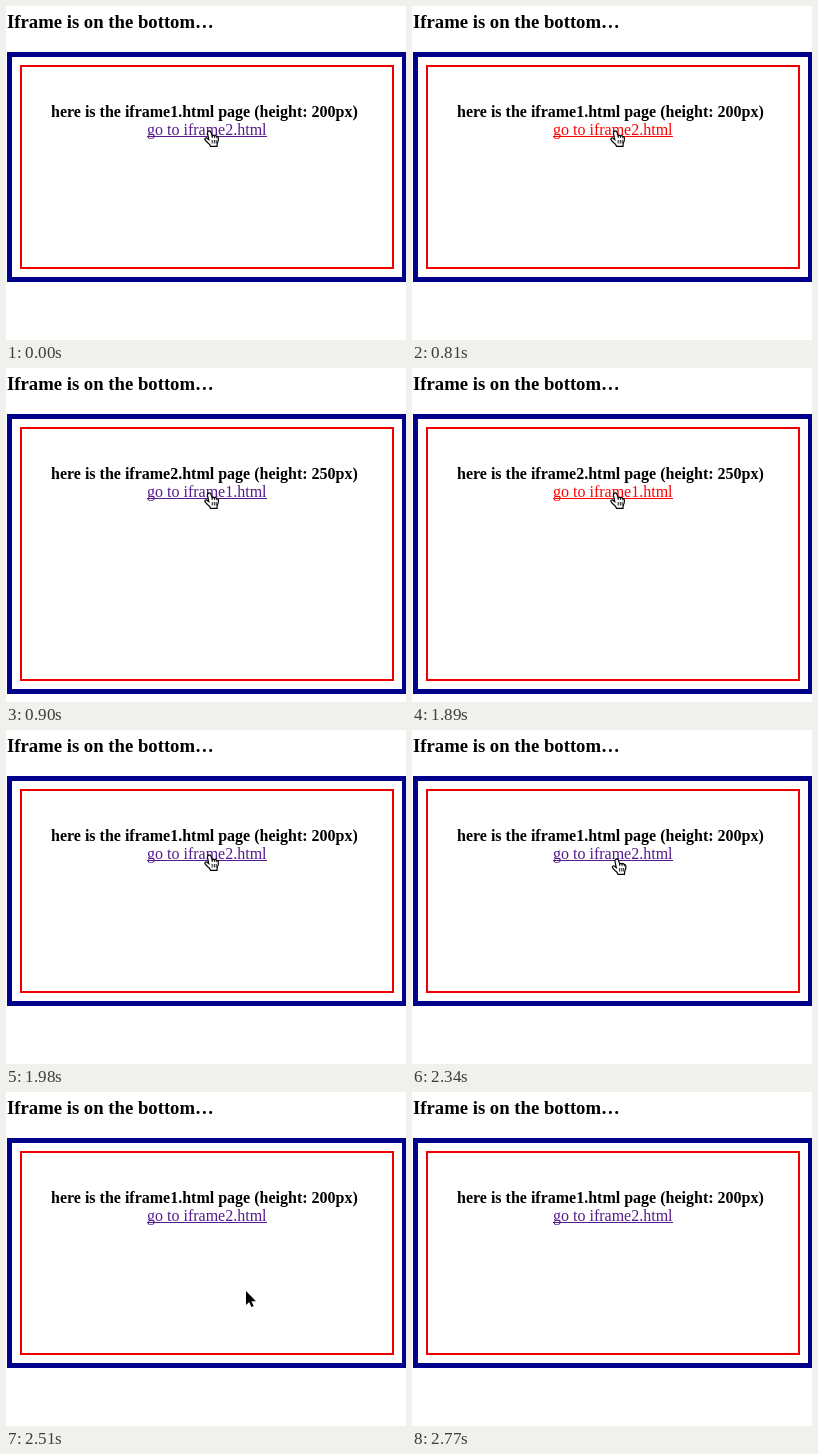
Animation, 400 px wide and 334 px high, one loop 2.94 s. Source, as an HTML page with a canvas:

```html
<!DOCTYPE html>
<html lang="en">
<head>
<meta charset="utf-8">
<title>Iframe height</title>
<style>
  html, body { margin: 0; width: 100%; height: 100%; overflow: hidden; background: #fff; }
  canvas { display: block; }
</style>
</head>
<body>
<canvas id="stage" width="400" height="334"></canvas>
<script>
const ctx = document.getElementById('stage').getContext('2d');
const LOOP = 2940;
const SERIF = '"Liberation Serif", "Times New Roman", serif';
const NAVY = '#00008b', RED = '#f00000', VISITED = '#551a8b', ACTIVE = '#ff0000';

const HAND = new Path2D('M4 1.6Q5.5-.1 6.8 1.8L8.2 6Q9.5 4.8 10.6 6Q12 5.2 12.9 6.7' +
  'Q14.3 6.4 14.4 8Q14.6 11 13.2 13.5L13 16.3H6.5Q6 14.5 3.8 12.8' +
  'Q1.5 10.8.8 9.3Q.8 7.6 2.6 8L4.8 9.6L3.4 3Z');
const FINGERS = new Path2D('M8.2 10v3.5M10.3 10v3.5M12.2 10v3.5M8.2 6v2M10.6 6v2M12.9 6.7v1.6');
const ARROW = new Path2D('M0 0V14L3.2 11L5.4 16L7.6 15L5.5 10.2H10Z');

// Exit path of the pointer: start time and hot spot of each step
const EXIT = [[2420, 216, 152], [2510, 240, 199], [2590, 272, 259], [2680, 300, 322]];

function text(str, x, y, font, color = '#000') {
  ctx.font = `${font} ${SERIF}`;
  ctx.fillStyle = color;
  ctx.fillText(str, x, y);
  return ctx.measureText(str).width;
}

function frame(x, y, w, h, line, color) {
  ctx.strokeStyle = color;
  ctx.lineWidth = line;
  ctx.strokeRect(x + line / 2, y + line / 2, w - line, h - line);
}

function hand(x, y) {
  ctx.save();
  ctx.translate(x, y);
  ctx.fillStyle = '#fff';
  ctx.strokeStyle = '#000';
  ctx.lineWidth = 1.2;
  ctx.fill(HAND);
  ctx.stroke(HAND);
  ctx.lineWidth = 0.9;
  ctx.stroke(FINGERS);
  ctx.restore();
}

function arrow(x, y) {
  ctx.save();
  ctx.translate(x, y);
  ctx.strokeStyle = '#fff';
  ctx.lineWidth = 2;
  ctx.stroke(ARROW);
  ctx.fillStyle = '#000';
  ctx.fill(ARROW);
  ctx.restore();
}

function pointer(t) {
  if (t < 2340) return hand(198, 124);
  if (t < 2420) return hand(199.5, 128);
  if (t >= 2770) return;
  const [, x, y] = EXIT.filter(step => t >= step[0]).pop();
  arrow(x, y);
}

function draw(t) {
  const second = t >= 900 && t < 1980;
  const pressed = (t >= 810 && t < 900) || (t >= 1890 && t < 1980);
  const [page, other, height] = second ? [2, 1, 250] : [1, 2, 200];
  const color = pressed ? ACTIVE : VISITED;

  ctx.fillStyle = '#fff';
  ctx.fillRect(0, 0, 400, 334);
  text('Iframe is on the bottom…', 1, 22, 'bold 18.72px');
  frame(1, 46, 400, height + 30, 5, NAVY);
  frame(14, 59, 374, height + 4, 2, RED);
  text(`here is the iframe${page}.html page (height: ${height}px)`, 45, 111, 'bold 16px');
  const width = text(`go to iframe${other}.html`, 141, 129, '16px', color);
  ctx.fillRect(141, 130, Math.round(width), 1);
  pointer(t);
}

function tick() {
  draw(performance.now() % LOOP);
  requestAnimationFrame(tick);
}
tick();
</script>
</body>
</html>
```
